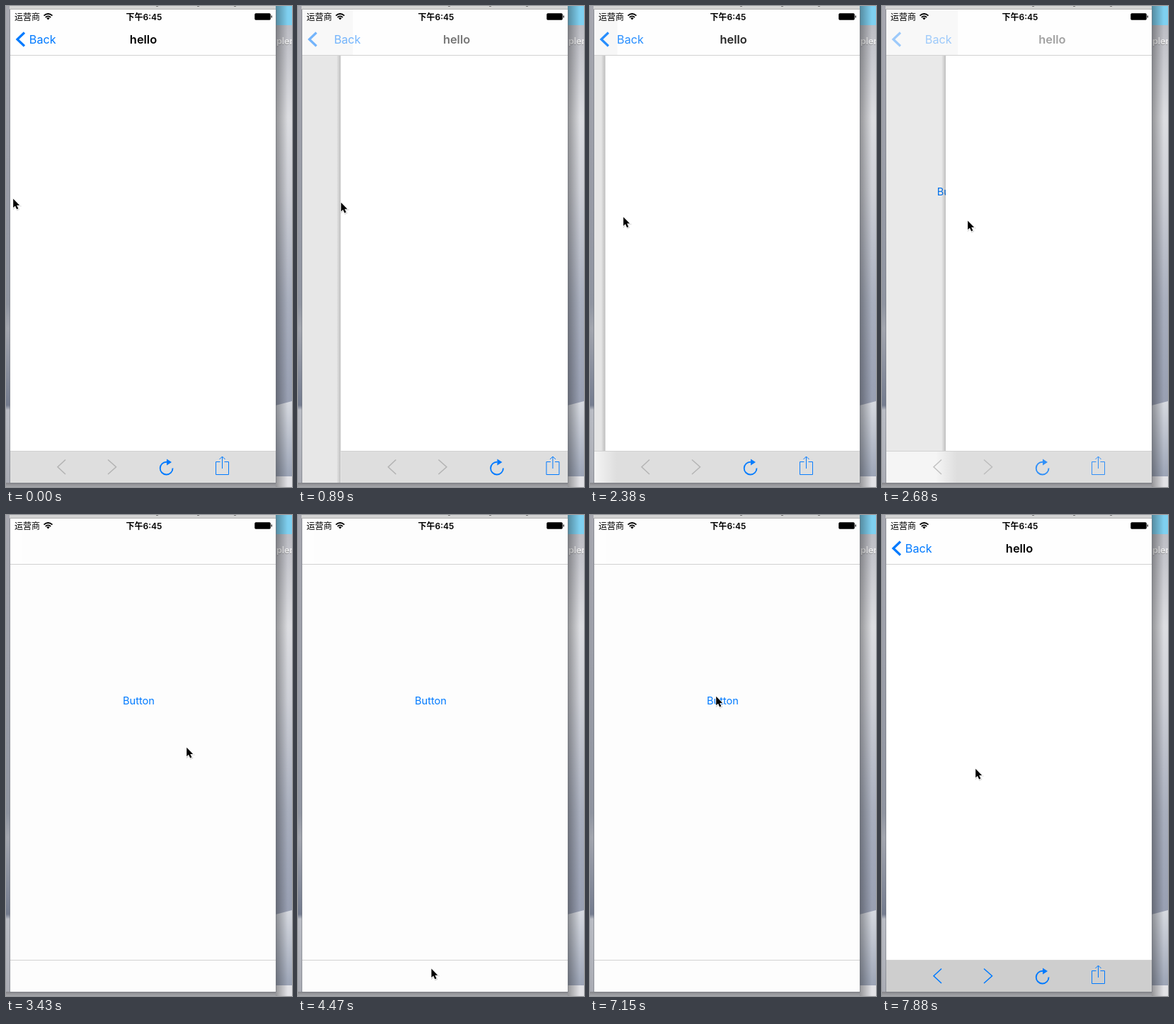
An HTML page that plays this animation: 404 px wide and 678 px high, repeating every 8 s.

```html
<!DOCTYPE html>
<html lang="zh">
<head>
<meta charset="utf-8">
<title>Swipe back</title>
<style>
html, body { margin: 0; width: 100%; height: 100%; overflow: hidden; background: #a5a8b2; }
svg { display: block; width: 100vw; height: 100vh; }
text { font-family: Inter, "Noto Sans CJK SC", "Noto Sans CJK", sans-serif; }
.blue { fill: none; stroke: #007aff; }
</style>
</head>
<body>
<svg viewBox="0 0 404 678" preserveAspectRatio="none">
  <defs>
    <linearGradient id="left" x2="0" y2="1">
      <stop offset="0" stop-color="#a7a8b0"/>
      <stop offset=".62" stop-color="#8f94a0"/>
      <stop offset=".67" stop-color="#a2a5ae"/>
      <stop offset=".83" stop-color="#747c8f"/>
      <stop offset=".84" stop-color="#b9bcc4"/>
      <stop offset="1" stop-color="#a9abb3"/>
    </linearGradient>
    <linearGradient id="right" x2="0" y2="1">
      <stop offset="0" stop-color="#bcbdc4"/>
      <stop offset=".2" stop-color="#dcdde1"/>
      <stop offset=".36" stop-color="#cdcfd6"/>
      <stop offset=".6" stop-color="#a9afbe"/>
      <stop offset="1" stop-color="#8a92a8"/>
    </linearGradient>
    <linearGradient id="snow" x2="0" y2="1">
      <stop offset="0" stop-color="#d6d9e0"/>
      <stop offset="1" stop-color="#9ca4b6"/>
    </linearGradient>
    <linearGradient id="side">
      <stop offset="0" stop-opacity=".34"/>
      <stop offset="1" stop-opacity="0"/>
    </linearGradient>
    <linearGradient id="under" x2="0" y2="1">
      <stop offset="0" stop-opacity=".36"/>
      <stop offset="1" stop-opacity=".2"/>
    </linearGradient>
    <linearGradient id="edge">
      <stop offset="0" stop-opacity="0"/>
      <stop offset="1" stop-opacity=".18"/>
    </linearGradient>
    <linearGradient id="wipe" gradientUnits="userSpaceOnUse" x1="-8" x2="22">
      <stop id="barLeft" offset="0"/>
      <stop id="barRight" offset="1"/>
    </linearGradient>
    <clipPath id="phone"><path d="M6 5H381V672H6Z"/></clipPath>
  </defs>

  <!-- desktop -->
  <path d="M0 0H6V678H0Z" fill="url(#left)"/>
  <path d="M381 27H404V678H381Z" fill="url(#right)"/>
  <path d="M381 0H404V27H381Z" fill="#7fd0f0"/>
  <path d="M381 563L404 557V663H381Z" fill="url(#snow)"/>
  <path d="M381 663H404V678H381Z" fill="#e2e2e6"/>
  <path d="M0 672H381V678H0Z" fill="#cfd0d6"/>
  <text x="382" y="55" font-size="12.5" font-weight="600" fill="#777" opacity=".6">pler</text>
  <text x="382" y="54" font-size="12.5" font-weight="600" fill="#f4f4f5">pler</text>
  <path d="M381 0H398V678H381Z" fill="url(#side)"/>
  <path d="M0 672H381V678H0Z" fill="url(#under)"/>
  <path d="M5 0H381V5H5Z" fill="#d3d3d3"/>
  <path d="M5 4.5H381" stroke="#b2b2b2"/>
  <path d="M212 .5h3M270 .5h3M322 .5h3" stroke="#777"/>
  <path d="M5.5 5V672.5H381.5V5" fill="none" stroke="#777a82" opacity=".55"/>

  <g clip-path="url(#phone)">
    <path d="M6 5H381V672H6Z" fill="#fdfdfd"/>
    <text id="button" x="165" y="266.5" font-size="14.6" fill="#007aff">Button</text>
    <path id="dim" d="M6 69H381V672H6Z"/>
    <g id="page">
      <path id="shade" d="M0 69H6V672H0Z" fill="url(#edge)"/>
      <path d="M6 69H381V672H6Z" fill="#fff"/>
    </g>

    <g id="toolbar">
      <path d="M6 627H381V672H6Z" fill="url(#wipe)"/>
      <path d="M6 627.5H381" stroke="#d2d2d2"/>
      <g id="icons" class="blue" stroke-width="1.5">
        <path id="arrows" d="M84 639.5L73 649.7L84 660M144 639.5L155.5 649.7L144 660"/>
        <path d="M227 642.7A8.9 8.9 0 1 0 235.500 651.500" stroke-width="1.9"/>
        <path d="M227 638.500L234 643L227 647.500Z" fill="#007aff" stroke="none"/>
        <path d="M302.500 642.500H296.500V660.500H314.500V642.500H308.500M305.500 652V635.500M301.500 639L305.500 635L309.500 639" stroke-width="1"/>
      </g>
    </g>

    <!-- navigation bar -->
    <path d="M6 5H381V69H6Z" fill="#fefefe"/>
    <path id="navTint" d="M-369 5H6V69H-369Z"/>
    <path d="M6 69.5H381" stroke="#d2d2d2"/>
    <g id="nav">
      <path class="blue" d="M26 37.500L16 47L26 56.500" stroke-width="3.2"/>
      <text id="back" x="32.800" y="53" font-size="16.200" fill="#007aff">Back</text>
      <text id="title" x="194" y="53" font-size="16.400" font-weight="600" text-anchor="middle">hello</text>
    </g>

    <!-- status bar -->
    <text x="12" y="19.500" font-size="12">运营商</text>
    <text x="195" y="19.500" font-size="12" font-weight="600" text-anchor="middle">下午6:45</text>
    <g fill="none" stroke="#000" stroke-width="1.7">
      <path d="M53.500 13.700Q59.500 8.300 65.500 13.700M55.800 16Q59.500 12.800 63.200 16"/>
      <path d="M57.300 17.200Q59.500 15.400 61.700 17.200L59.500 19.500Z" fill="#000" stroke="none"/>
    </g>
    <rect x="351.500" y="10.500" width="22" height="9" rx="1.500" stroke="#000" stroke-opacity=".5"/>
    <path d="M374.600 13.500h1.200v3h-1.200Z"/>
  </g>

  <g id="cursor">
    <g transform="translate(.2 .8) scale(.93)">
      <path d="M.6 1V14.500L3.600 11.500L6 17L8.600 15.800L6.200 10.600H10.400Z" opacity=".15" stroke="#000" stroke-width="2"/>
      <path d="M0 0V13.500L3 10.600L5.300 15.800L7.700 14.800L5.400 9.800H9.600Z" stroke="#fff" stroke-width="1.600" paint-order="stroke"/>
    </g>
  </g>
</svg>

<script>
const LOOP = 8000, STEP = 148.6, WIDTH = 375;

// Step ranges of the three gestures: a cancelled peek, the full swipe, the push.
const PEEK = [2, 13], SWIPE = [15, 23], PUSH = [49, 53];

// Pointer way points: step, x, y.
const WAY = [
  [2, 10, 271], [15, 10, 294], [18, 121, 302], [23, 255, 327], [29, 200, 640],
  [33, 153, 635], [38, 161, 633], [42, 236, 655], [48, 178, 255], [50, 178, 258], [53, 132, 357]
];

const $ = id => document.getElementById(id);
const set = (id, attrs) => {
  for (const name in attrs) $(id).setAttribute(name, attrs[name]);
};
const move = (x, y = 0) => `translate(${x} ${y})`;
const gray = v => `rgb(${[v, v, v].map(Math.round)})`;
const part = (k, [from, to]) => Math.min(1, Math.max(0, (k - from) / (to - from)));

const peek = k => 72 * Math.sin(Math.PI * part(k, PEEK));

function pageOffset(k) {
  if (k > PUSH[0]) return WIDTH * (1 - part(k, PUSH)) ** 3;
  return peek(k) + WIDTH * part(k, SWIPE) ** 1.525;
}

function pointerAt(k) {
  const i = Math.max(1, WAY.findIndex(point => point[0] >= k));
  const [from, x, y] = WAY[i - 1], [to, x2, y2] = WAY[i];
  const f = part(k, [from, to]);
  return [x + (x2 - x) * f + 0.93 * peek(k), y + (y2 - y) * f];
}

function draw(time) {
  const k = Math.floor(time % LOOP / STEP);
  const offset = pageOffset(k);
  const p = offset / WIDTH, rest = 1 - p;
  const fades = k > PEEK[1], pushed = k > PUSH[0];
  const bar = gray(pushed ? 206 : 222);
  const tint = gray(253 - 10 * rest);

  set('button', { transform: move(-0.3 * WIDTH * rest) });
  set('dim', { opacity: 0.1 * rest });
  set('page', { transform: move(offset) });
  set('shade', { opacity: Math.min(1, 3 * rest) });

  set('toolbar', { transform: move(fades ? 0 : offset) });
  set('wipe', { gradientTransform: move(p === 1 ? 400 : offset) });
  set('barLeft', { 'stop-color': fades && p > 0 ? tint : bar });
  set('barRight', { 'stop-color': bar });
  set('icons', { opacity: fades ? rest : 1 });
  set('arrows', { stroke: pushed ? '#007aff' : '#b3b3b3' });

  set('navTint', {
    transform: move(offset + 17),
    fill: gray(253 - 6 * rest),
    opacity: p > 0 ? 1 : 0
  });
  set('nav', { opacity: rest ** 4 });
  set('back', { transform: move(125 * p) });
  set('title', { transform: move(207 * p) });
  set('cursor', { transform: move(...pointerAt(k)) });
}

const start = performance.now();
function tick() {
  draw(performance.now() - start);
  requestAnimationFrame(tick);
}
tick();
</script>
</body>
</html>
```
